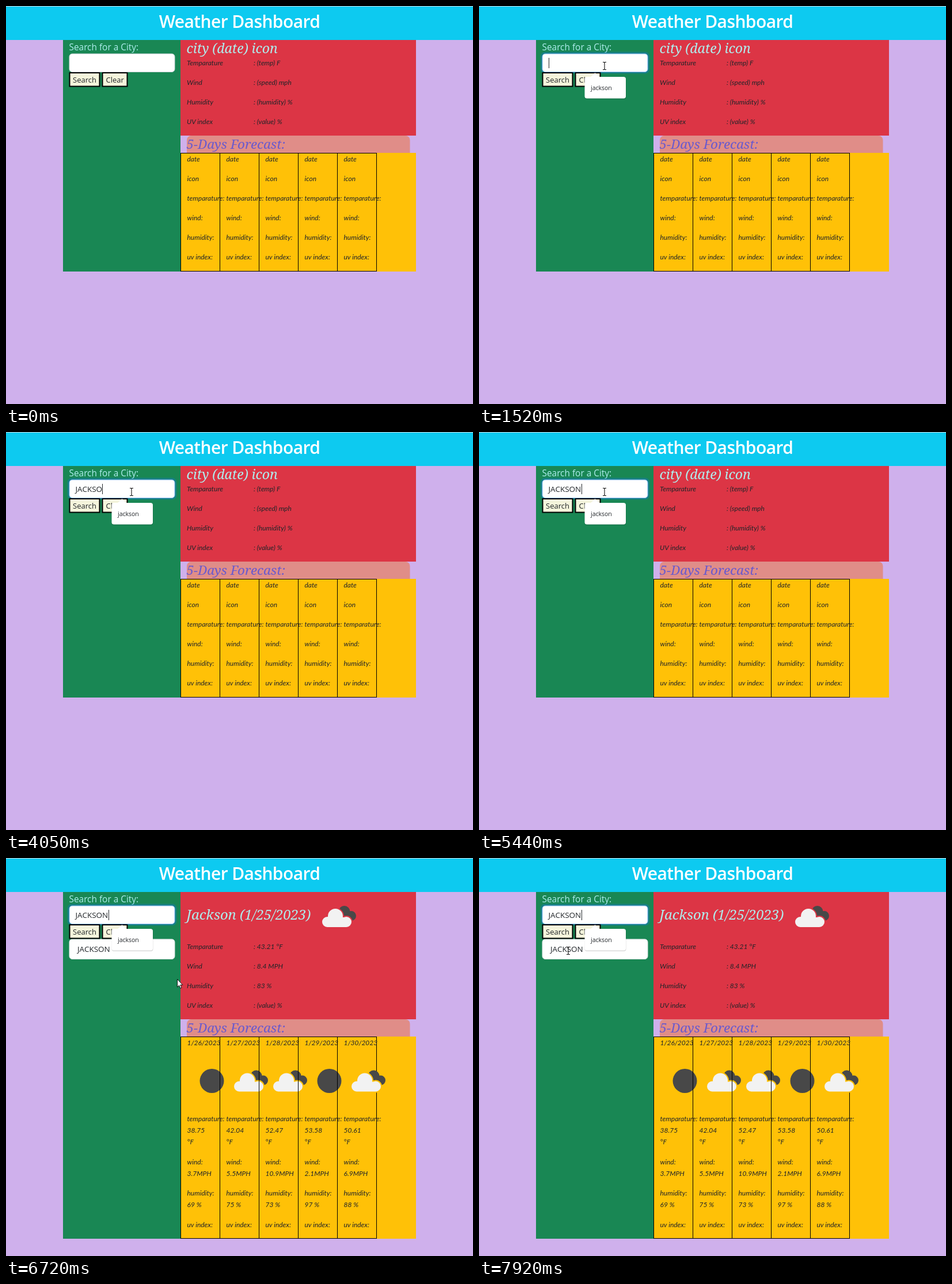
Animation, 811 px wide and 691 px high, one loop 8000 ms. Source, as an HTML page:

```html
<!DOCTYPE html>
<html lang="en">
<head>
<meta charset="utf-8">
<title>Weather Dashboard</title>
<style>
  html, body { margin: 0; width: 100%; height: 100%; overflow: hidden; background: #cfb0ec; }
  svg { display: block; }
  text { white-space: pre; }
  .ui { font-family: "Open Sans", "Noto Sans", sans-serif; fill: #212529; }
  .body { font: italic 12px Lato, sans-serif; fill: #212529; }
  .serif { font-family: "Noto Serif", serif; font-style: italic; }
  .button { fill: #f5f5dc; stroke: #000; stroke-width: 2; }
</style>
</head>
<body>
<svg width="811" height="691" viewBox="0 0 811 691">
  <rect width="811" height="691" fill="#cfb0ec"/>
  <rect width="811" height="59" fill="#0dcaf0"/>
  <rect width="811" height="1" fill="#c9dde6"/>
  <text class="ui" x="405.5" y="38" text-anchor="middle" font-size="30" font-weight="600" letter-spacing="-.6" style="fill:#fff">Weather Dashboard</text>

  <g id="pages"></g>

  <text class="ui" x="109.5" y="77" font-size="15.4" style="fill:#afeeee">Search for a City:</text>
  <rect id="ring" x="106.5" y="79.5" width="190" height="38" rx="8" fill="#0d6efd" fill-opacity=".25"/>
  <rect id="field" x="110" y="83" width="183" height="31.5" rx="5" fill="#fff" stroke="#ced4da"/>
  <circle id="click" cx="216" cy="104" r="10" fill="#ffff80"/>
  <text id="typed" class="ui" x="120.5" y="104" font-size="13.5"></text>
  <rect id="caret" y="90" width="1" height="18" fill="#212529"/>

  <rect class="button" x="110.5" y="116" width="52" height="23.5"/>
  <text class="ui" x="116" y="133" font-size="13">Search</text>
  <rect class="button" x="167.5" y="116" width="43" height="23.5"/>
  <text class="ui" x="173.5" y="133" font-size="13">Clear</text>

  <g id="popup">
    <rect x="183.5" y="124" width="72" height="38" rx="4" fill="#000" fill-opacity=".15"/>
    <path d="M193 124L201.500 116L210 124Z" fill="#fff"/>
    <rect x="183.5" y="123" width="71.5" height="37.5" rx="4" fill="#fff"/>
    <text class="ui" x="194" y="146" font-size="10.5">jackson</text>
  </g>

  <path id="arrow" d="M.5 .5V14L3.600 11.200L5.800 16.200L8 15.200L5.800 10.300H9.800Z" fill="#fff" stroke="#000" stroke-width=".9"/>
  <path id="beam" d="M-3 -6.500H-1L0 -5.500L1 -6.500H3M0 -5.500V5.500M-3 6.500H-1L0 5.500L1 6.500H3" fill="none" stroke="#111" stroke-width="1.1"/>
</svg>
<script>
const $ = id => document.getElementById(id);
const LOOP = 8000, TICK = 67, RESULT_AT = 5570;
const RED = '#dc3545', GOLD = '#ffc107';

const rect = (x, y, w, h, fill, extra = '') =>
  `<rect x="${x}" y="${y}" width="${w}" height="${h}" fill="${fill}" ${extra}/>`;
const label = (x, y, s) => `<text class="body" x="${x}" y="${y}">${s}</text>`;
const heading = (x, y, size, fill, s) =>
  `<text class="serif" x="${x}" y="${y}" font-size="${size}" fill="${fill}">${s}</text>`;

const disc = (x, y, r) => `M${x - r} ${y}a${r} ${r} 0 0 1 ${2 * r} 0a${r} ${r} 0 0 1 ${-2 * r} 0Z`;
const cloud = (x, y, back) => `<g transform="translate(${x} ${y})">
  <path fill="#484848" d="${disc(38.5, 10, 10)}${disc(50.5, 17.5, 8.5)}M30 10H46L51 26H30Z"/>
  <path fill="#f2f2f2" stroke="${back}" stroke-width="4" paint-order="stroke"
    d="${disc(9, 28, 9)}${disc(23, 18, 13)}${disc(42, 28, 9)}M9 20H42V37H9Z"/></g>`;
const moon = x => `<circle cx="${x}" cy="387" r="21" fill="#484848"/>`;

// The result page pushes everything under the city heading down.
function page(shift, bottom, top, values, columns) {
  const names = ['Temparature', 'Wind', 'Humidity', 'UV index'];
  const tableTop = 255 + shift;
  return rect(99, 59, 204, bottom - 59, '#198754') +
    rect(303, 59, 409, 166 + shift, RED) + top +
    names.map((n, i) => label(314, 103 + shift + 34 * i, n) +
      label(430, 103 + shift + 34 * i, ': ' + values[i])).join('') +
    rect(314, 225 + shift, 387.5, 40, '#e08d88', 'rx="8"') +
    heading(313.5, 248 + shift, 22.4, '#6a5acd', '5-Days Forecast:') +
    rect(303, tableTop, 409, bottom - tableTop, GOLD) +
    columns.map((content, i) =>
      rect(303.5 + 68 * i, tableTop + .5, 68, bottom - tableTop - 1, 'none', 'stroke="#000"') +
      content).join('');
}

const blankColumn = (_, i) =>
  ['date', 'icon', 'temparature:', 'wind:', 'humidity:', 'uv index:']
    .map((s, row) => label(314.5 + 68 * i, 270 + 34 * row, s)).join('');

function dayColumn([temp, wind, humidity, clear], i) {
  const x = 314.5 + 68 * i;
  const lines = [[324.5, `1/${26 + i}/2023`], [457, 'temparature:'], [477, temp], [497, '°F'],
    [532, 'wind:'], [552, wind + 'MPH'], [586, 'humidity:'], [606, humidity + ' %'], [640.5, 'uv index:']];
  return (clear ? moon(x + 43) : cloud(x + 13.5, 368.5, GOLD)) +
    lines.map(([y, s]) => label(x, y, s)).join('');
}

const days = [['38.75', '3.7', 69, true], ['42.04', '5.5', 75], ['52.47', '10.9', 73],
  ['53.58', '2.1', 97, true], ['50.61', '6.9', 88]];

$('pages').innerHTML =
  `<g id="before">${page(0, 461, heading(313.5, 82, 23, '#afeeee', 'city (date) icon'),
    ['(temp) F', '(speed) mph', '(humidity) %', '(value) %'], days.map(blankColumn))}</g>` +
  `<g id="after">${page(55, 661,
    heading(313.5, 107, 23.8, '#afeeee', 'Jackson (1/25/2023)') + cloud(549, 83, RED),
    ['43.21 °F', '8.4 MPH', '83 %', '(value) %'], days.map(dayColumn))}` +
  rect(110, 141, 183, 34.5, '#fff', 'rx="5" stroke="#dfe3e6"') +
  '<text class="ui" x="124" y="163" font-size="13.5">JACKSON</text></g>';

const keyTimes = [2790, 3000, 3250, 3600, 3850, 4050, 4380];
const caretStops = [121, 125, 133, 142, 150, 157, 167, 178];
const caretOff = [[1850, 2390], [4920, 5440], [5970, 6500], [7030, 7550]];

// time, x, y of the pointer's hot spot
const pointer = [[180, 650, 595], [250, 430, 380], [320, 241, 175], [583, 241, 175], [990, 218, 104],
  [6373, 218, 104], [6580, 232, 168], [6720, 297, 210], [6790, 303, 212], [6980, 468, 252],
  [7183, 220, 182], [7590, 150, 166], [7920, 155, 161]];

function pointerAt(t) {
  let i = pointer.length - 1;
  while (i > 0 && pointer[i][0] > t) i--;
  const [t0, x0, y0] = pointer[i], [t1, x1, y1] = pointer[i + 1] || [LOOP, x0, y0];
  const k = Math.min(1, Math.floor((t - t0) / TICK) * TICK / (t1 - t0));
  return [x0 + (x1 - x0) * k, y0 + (y1 - y0) * k];
}

const inside = (x, y, l, t, r, b) => x > l && x < r && y > t && y < b;
const show = (id, on) => $(id).setAttribute('visibility', on ? 'visible' : 'hidden');
const ramp = (t, a, b) => Math.max(0, Math.min(1, (t - a) / (b - a)));

function draw(t) {
  const done = t >= RESULT_AT;
  show('before', !done);
  show('after', done);

  const focus = ramp(t, 1340, 1520);
  $('ring').setAttribute('opacity', focus);
  $('field').setAttribute('stroke', focus > .3 ? '#86b7fe' : '#ced4da');
  $('popup').setAttribute('opacity', ramp(t, 1390, 1510));
  $('click').setAttribute('opacity', t < 1320 ? 0 : 1 - ramp(t, 1390, 1520));

  const count = keyTimes.filter(k => t >= k).length;
  $('typed').textContent = 'JACKSON'.slice(0, count);
  $('caret').setAttribute('x', caretStops[count]);
  show('caret', t >= 1320 && !caretOff.some(([a, b]) => t >= a && t < b));

  const [x, y] = pointerAt(Math.max(t, 180));
  const overText = inside(x, y, 110, 83, 293, 115) ||
    done && (inside(x, y, 110, 141, 293, 176) || inside(x, y, 430, 240, 484, 262));
  show('arrow', t >= 180 && !overText);
  show('beam', t >= 180 && overText);
  for (const id of ['arrow', 'beam'])
    $(id).setAttribute('transform', `translate(${Math.round(x)} ${Math.round(y)})`);
}

const start = performance.now();
function frame() {
  draw((performance.now() - start) % LOOP);
  requestAnimationFrame(frame);
}
frame();
</script>
</body>
</html>
```
